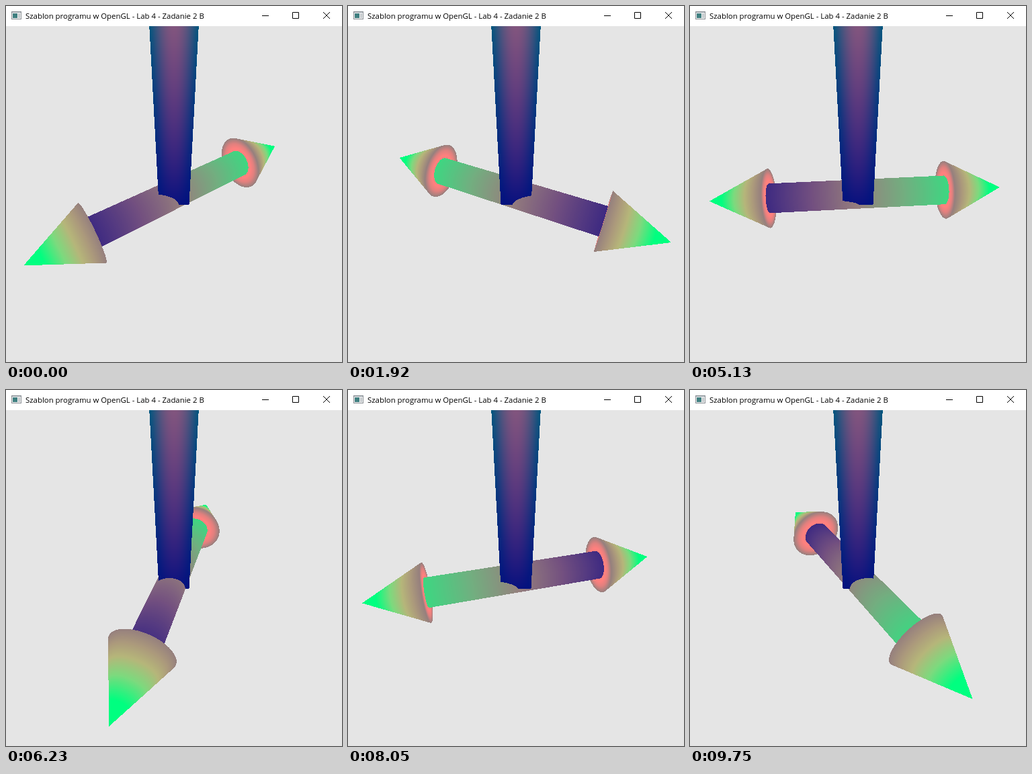
Animation, 500 px wide and 530 px high, one loop 9830 ms. Source, as an HTML page with a canvas:

```html
<!DOCTYPE html>
<html lang="pl">
<head>
<meta charset="utf-8">
<style>
  html, body { margin: 0; width: 100%; height: 100%; overflow: hidden; background: #e5e5e5; }
  svg, canvas { position: absolute; left: 0; }
  svg { top: 0; }
  canvas { top: 30px; }
  text { font: 11.4px "Open Sans", "Noto Sans", sans-serif; }
</style>
</head>
<body>
<svg width="500" height="30">
  <rect width="500" height="30" fill="#fff"/>
  <rect x="8.5" y="8.5" width="14" height="11" fill="#f4f4f4" stroke="#8a8f94"/>
  <path d="M9 9.5H22" stroke="#a9b3ba"/>
  <rect x="10" y="11" width="7" height="7" fill="#3f7f80"/>
  <rect x="18" y="11" width="3" height="7" fill="#c4cacd"/>
  <text x="29" y="19">Szablon programu w OpenGL - Lab 4 - Zadanie 2 B</text>
  <path d="M381 14.5H391M426.5 9.5H435.5V18.5H426.5ZM472 9L482 19M482 9L472 19" fill="none" stroke="#000"/>
</svg>
<canvas id="view" width="500" height="500"></canvas>
<script>
const SIZE = 500, FOCAL = 433, LOOP = 9830, STEP = 78.6, LAST = 124;
const EYE = Math.SQRT2, TILT = Math.SQRT1_2;
const ROD = 0.1, ROD_END = 0.6, CONE = 0.2;
const SLOPE = (CONE / (1 - ROD_END)) ** 2;

// [step, heading of the purple end in degrees]
const headings = [[0, 146.1], [24, 23.8], [44, -75], [65, -183.9], [79, -252.8], [102, -373], [124, -483.8]];

const ctx = document.getElementById('view').getContext('2d');
const image = ctx.createImageData(SIZE, SIZE);
const pixels = new Uint32Array(image.data.buffer);

const pack = (r, g, b) => (255 << 24 | b << 16 | g << 8 | r) >>> 0;

// Linear interpolation through rows of [position, ...values]
function sample(rows, x) {
  let i = 1;
  while (i < rows.length - 1 && x > rows[i][0]) i++;
  const a = rows[i - 1], b = rows[i];
  const f = (x - a[0]) / (b[0] - a[0]);
  return a.slice(1).map((v, n) => v + (b[n + 1] - v) * f);
}

const ramp = stops => Uint32Array.from({ length: 257 }, (_, i) => pack(...sample(stops, i / 256)));

const rodRamp = ramp([[0, 62, 215, 130], [0.25, 115, 174, 128], [0.5, 150, 128, 126], [0.75, 115, 80, 128], [1, 62, 42, 130]]);
const coneRamp = ramp([[0, 150, 128, 126], [0.15, 172, 154, 124], [0.3, 182, 182, 122], [0.5, 125, 218, 126], [0.75, 0, 255, 128], [1, 0, 255, 128]]);
const discRamp = ramp([[0, 255, 128, 128], [0.6, 255, 128, 126], [0.78, 225, 128, 126], [1, 150, 128, 126]]);
const BACK = pack(229, 229, 229);

function poleColor(x, y) {
  const glow = Math.cos(x / ROD * Math.PI / 2);
  return pack((8 + 115 * y) * glow, 18 + 35 * y + 27 * y * y, 126);
}

function render(heading) {
  const c = Math.cos(heading), s = Math.sin(heading);
  // Eye in the rod's frame: p along the rod, q across it, y up
  const p0 = EYE * s, q0 = EYE * c, y0 = EYE;

  for (let row = 0, i = 0; row < SIZE; row++) {
    const v = (SIZE / 2 - row - 0.5) / FOCAL;
    const dy = (v - 1) * TILT, dz = (-v - 1) * TILT;
    const poleT = (ROD - EYE) / dz, poleY = EYE + poleT * dy;

    for (let col = 0; col < SIZE; col++, i++) {
      const dx = (col + 0.5 - SIZE / 2) / FOCAL;
      const dp = dx * c + dz * s, dq = dz * c - dx * s;
      let near = Infinity, color = BACK;

      const poleX = poleT * dx;
      if (poleY > 0 && Math.abs(poleX) < ROD) {
        near = poleT;
        color = poleColor(poleX, poleY);
      }

      const A = dq * dq + dy * dy, B = q0 * dq + y0 * dy, C = q0 * q0 + y0 * y0;
      const root = B * B - A * (C - ROD * ROD);
      if (root > 0) {
        const t = (-B - Math.sqrt(root)) / A, p = p0 + t * dp;
        if (t < near && Math.abs(p) < ROD_END) {
          near = t;
          color = rodRamp[(p / ROD_END + 1) * 128 | 0];
        }
      }

      for (let side = -1; side < 2; side += 2) {
        const discT = (side * ROD_END - p0) / dp;
        const r2 = A * discT * discT + 2 * B * discT + C;
        if (discT > 0 && discT < near && r2 < CONE * CONE) {
          near = discT;
          color = discRamp[Math.sqrt(r2) / CONE * 256 | 0];
        }
        // m is the distance back from the apex along the axis
        const m0 = 1 - side * p0, dm = -side * dp;
        const a = A - SLOPE * dm * dm, b = B - SLOPE * m0 * dm;
        const disc = b * b - a * (C - SLOPE * m0 * m0);
        if (disc < 0) continue;
        const sq = Math.sqrt(disc);
        for (let sign = -1; sign < 2; sign += 2) {
          const t = (-b + sign * sq) / a, m = m0 + t * dm;
          if (t > 0 && t < near && m > 0 && m < 1 - ROD_END) {
            near = t;
            color = coneRamp[(1 - m / (1 - ROD_END)) * 256 | 0];
          }
        }
      }
      pixels[i] = color;
    }
  }
  ctx.putImageData(image, 0, 0);
}

let shown = -1;
function tick() {
  const step = Math.min(LAST, Math.floor(performance.now() % LOOP / STEP));
  if (step !== shown) {
    shown = step;
    render(sample(headings, step)[0] * Math.PI / 180);
  }
  requestAnimationFrame(tick);
}
tick();
</script>
</body>
</html>
```
